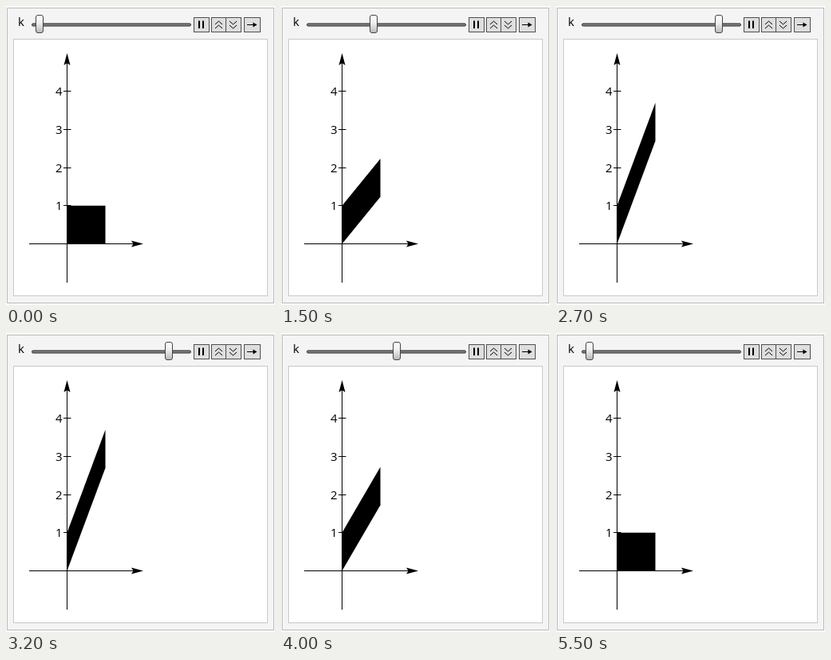
Write an HTML page that moves like this. It is 337 by 374 pixels and loops after 6 s.

```html
<!DOCTYPE html>
<html lang="en">
<head>
<meta charset="utf-8">
<title>Shear of a unit square</title>
<style>
  html, body { margin: 0; width: 100%; height: 100%; overflow: hidden; background: #fff; }
  svg { display: block; }
  text { font: 15px "Open Sans", "Noto Sans", sans-serif; }
  .line { fill: none; stroke: #000; }
  .button { fill: #dedede; stroke: #505050; }
</style>
</head>
<body>
<svg width="337" height="374" viewBox="0 0 337 374">
  <defs>
    <linearGradient id="knob" x2="0" y2="1">
      <stop offset="0" stop-color="#fff"/>
      <stop offset=".45" stop-color="#eee"/>
      <stop offset="1" stop-color="#b8b8b8"/>
    </linearGradient>
    <path id="head" d="M0 0L-15 -4L-12.5 0L-15 4Z"/>
  </defs>

  <rect x="1.5" y="2.5" width="334" height="369" fill="#f4f4f4" stroke="#b9b9b9"/>
  <rect x="9.5" y="41.5" width="318" height="321" fill="#fff" stroke="#c9c9c9"/>

  <text x="15" y="25">k</text>
  <rect x="32.5" y="22" width="199" height="3" rx="1.5" fill="#888" stroke="#222"/>
  <rect id="handle" x="-4.5" y="11.5" width="9" height="22" rx="2.5" fill="url(#knob)" stroke="#444"/>

  <g class="button">
    <rect x="235.5" y="14.5" width="19" height="18"/>
    <rect x="257.5" y="14.5" width="18" height="18"/>
    <rect x="275.5" y="14.5" width="19" height="18"/>
    <rect x="298.5" y="14.5" width="20" height="18"/>
  </g>
  <path class="line" stroke-width="2" d="M242 18.5V28M247 18.5V28"/>
  <path class="line" d="M262 23l4.5-4l4.5 4M262 28l4.5-4l4.5 4M280 19l4.5 4l4.5-4M280 24l4.5 4l4.5-4M302 23.5H312"/>
  <path d="M314.5 23.5l-5-3v6z"/>

  <polygon id="shape"/>
  <path class="line" d="M76.5 70V346M29 297.5H162"/>
  <use href="#head" transform="translate(76.5 59) rotate(-90)"/>
  <use href="#head" transform="translate(172 297.5)"/>
  <g id="ticks"></g>
</svg>
<script>
  const UNIT = 47.75, X0 = 76.5, Y0 = 297.5;
  const byId = id => document.getElementById(id);

  byId("ticks").innerHTML = [1, 2, 3, 4].map(n => {
    const y = Math.floor(Y0 - n * UNIT) + 0.5;
    return `<path class="line" d="M72 ${y}H81.5"/>
      <text x="70.5" y="${y + 5}" text-anchor="end">${n}</text>`;
  }).join("");

  function draw(ms) {
    const t = ms % 6000;
    const resting = t < 500 || t >= 5500;
    const frame = Math.floor((t - 500) / 100);
    const step = Math.min(frame, 49 - frame);
    const k = resting ? 0 : 0.01 + 0.1222 * step;
    const x = resting ? 42 : Math.round(43 + 7.3 * step);

    byId("handle").setAttribute("transform", `translate(${x})`);
    const corners = [[0, 0], [1, k], [1, k + 1], [0, 1]];
    byId("shape").setAttribute("points",
      corners.map(([u, v]) => [X0 + u * 48, Y0 - v * UNIT]).join(" "));
  }

  const start = performance.now();
  function tick() {
    draw(performance.now() - start);
    requestAnimationFrame(tick);
  }
  tick();
</script>
</body>
</html>
```
